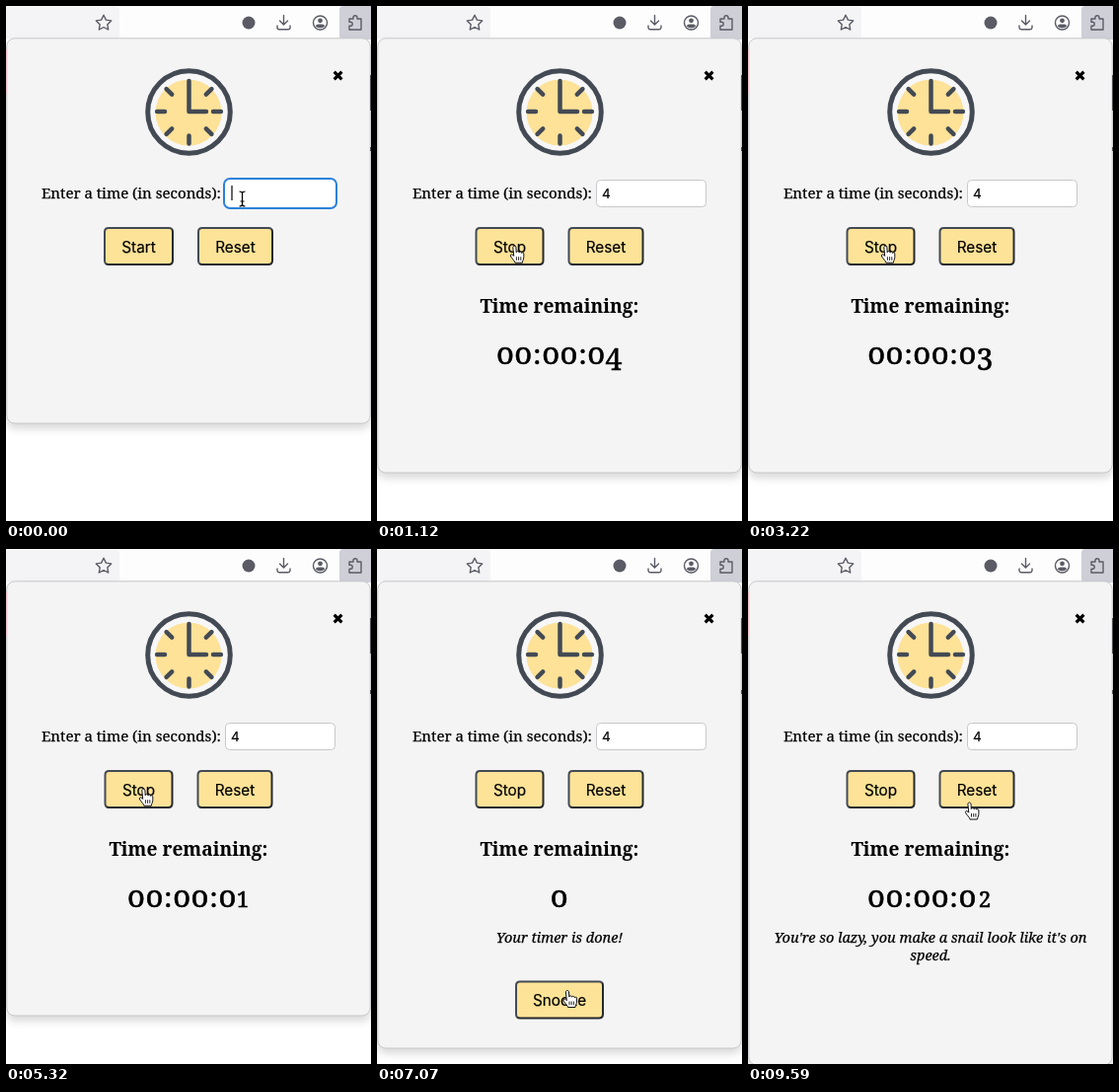
An HTML page that plays this animation: 370 by 522 pixels, repeating every 9.66 s.

```html
<!DOCTYPE html>
<html lang="en">
<head>
<meta charset="utf-8">
<title>Timer popup</title>
<style>
  html, body { margin: 0; width: 100%; height: 100%; overflow: hidden; background: #fff; }
  svg { display: block; width: 100%; height: 100%; }
  text { font-family: "Noto Serif", Georgia, serif; text-anchor: middle; white-space: pre; }
  .sans { font-family: Inter, "Liberation Sans", sans-serif; font-size: 15.3px; stroke: #000; stroke-width: .2; }
  .label { font-size: 15.05px; text-anchor: start; }
  .head { font-size: 19.15px; font-weight: 700; }
  .note { font-size: 14.5px; font-style: italic; }
  .label, .note { stroke: #000; stroke-width: .25; }
  .figure { stroke: #000; stroke-width: .6; }
  .icon { fill: none; stroke: #5b5b66; stroke-width: 1.4; stroke-linejoin: round; stroke-linecap: round; }
  .clock { fill: none; stroke: #434a54; stroke-width: 4.5; stroke-linecap: round; stroke-linejoin: round; }
  .edge { fill: none; stroke-width: 2; }
  #panel { fill: #f4f4f4; stroke: #c6c6c9; filter: drop-shadow(0 5px 4.5px rgba(0, 0, 0, .15)); }
</style>
</head>
<body>
<svg viewBox="0 0 370 522" xmlns="http://www.w3.org/2000/svg">
  <rect width="370" height="522" fill="#fff"/>
  <rect width="370" height="34" fill="#fdfdfd"/>
  <rect x="-8" y="1" width="123" height="32" rx="4" fill="#f4f4f6"/>
  <rect x="338" y="0" width="36" height="34" rx="4" fill="#cfcfd8"/>
  <g class="icon">
    <path d="M99 9.2l2.4 4.9 5.3.8-3.9 3.8.9 5.3-4.7-2.5-4.7 2.5.9-5.3-3.9-3.8 5.3-.8z"/>
    <path d="M281.5 9.5v9M277.5 15l4 4 4-4M275 20v1.7q0 2 2 2h9q2 0 2-2V20"/>
    <circle cx="318.5" cy="17" r="7"/>
    <path d="M348 13h4v-1.3a2 2 0 0 1 4 0V13h4v11h-12V20.2h1.2a2 2 0 0 0 0-4H348z"/>
  </g>
  <g fill="#5b5b66">
    <circle cx="246" cy="17" r="6.5"/>
    <circle cx="318.5" cy="14.8" r="2.4"/>
    <path d="M314 20.8q0-2.3 2.3-2.3h4.4q2.3 0 2.3 2.3-4.5 3-9 0z"/>
  </g>

  <rect id="panel" x=".8" y="32.8" width="368.4" rx="8"/>
  <path d="M.5 44v44" stroke="#f3c3cb"/>
  <path d="M369.5 70v36M369.5 143v4" stroke="#55555c"/>

  <circle cx="185.5" cy="107.5" r="41.8" fill="#f7f7f8" stroke="#434a54" stroke-width="5"/>
  <circle cx="185" cy="108" r="33.5" fill="#fde298"/>
  <g class="clock">
    <path id="ticks"/>
    <path d="M185.5 76v31H203"/>
  </g>
  <text x="336.5" y="76.3" font-size="15" style="font-family:'DejaVu Sans',sans-serif">✖</text>

  <text class="label" x="36" y="195">Enter a time (in seconds):</text>
  <rect id="field" fill="#fff"/>
  <text id="typed" class="sans" x="232.3" y="194.8" style="font-size:13.6px">4</text>
  <path id="caret" stroke="#000" stroke-width="1.2"/>

  <g id="buttons"></g>
  <g id="timer"></g>
  <g id="cursor"></g>
</svg>
<script>
const LOOP = 9660, STEP = 70;
const $ = id => document.getElementById(id);
const cache = {};

function html(id, markup) {
  if (cache[id] !== markup) $(id).innerHTML = cache[id] = markup;
}
function attrs(id, values) {
  for (const name in values) $(id).setAttribute(name, values[name]);
}
// Last value whose start time has passed
function at(t, rows) {
  return rows.reduce((value, row) => t >= row[0] ? row[1] : value, rows[0][1]);
}
const within = (t, ...spans) => spans.some(([a, b]) => t >= a && t < b);

const text = (cls, x, y, str) => `<text class="${cls}" x="${x}" y="${y}">${str}</text>`;

function button({ x, y, w, h, label, down }) {
  const [light, dark] = down ? ['#25292e', '#434a54'] : ['#434a54', '#25292e'];
  const r = x + w - 1, b = y + h - 1, l = x + 1, top = y + 1;
  return `<rect x="${l}" y="${top}" width="${w - 2}" height="${h - 2}" rx="4" fill="#fde397"/>
    <path class="edge" stroke="${light}" d="M${l + 1} ${b - 1}Q${l} ${b - 2} ${l} ${b - 4}V${top + 4}Q${l} ${top} ${l + 4} ${top}H${r - 4}Q${r - 2} ${top} ${r - 1} ${top + 1}"/>
    <path class="edge" stroke="${dark}" d="M${l + 1} ${b - 1}Q${l + 2} ${b} ${l + 4} ${b}H${r - 4}Q${r} ${b} ${r} ${b - 4}V${top + 4}Q${r} ${top + 2} ${r - 1} ${top + 1}"/>`
    + text('sans', x + w / 2, y + h / 2 + 6.2, label);
}

// Old-style figures: [glyph, size, drop, advance]
const FIGURES = {
  0: ['o', 31, 0, 18.4], 1: ['1', 22.4, 0, 12.9], 2: ['2', 22.4, 0, 16.8],
  3: ['3', 30, 5.8, 16.6], 4: ['4', 30, 5.8, 17], ':': [':', 28, 0, 9.4]
};
function figures(str) {
  const set = [...str].map(c => FIGURES[c]);
  let x = 184.6 - set.reduce((sum, f) => sum + f[3], 0) / 2;
  return set.map(([glyph, size, drop, adv]) => {
    x += adv;
    return `<text class="figure" font-size="${size}" x="${x - adv / 2}" y="${363 + drop}">${glyph}</text>`;
  }).join('');
}

const SHAPES = {
  beam: `<path d="M-3-7q3 0 3 2V6q0 2-3 2M3-7q-3 0-3 2M0 6q0 2 3 2M-2 3H2" fill="none" stroke="#fff" stroke-width="2.6"/>
    <path d="M-3-7q3 0 3 2V6q0 2-3 2M3-7q-3 0-3 2M0 6q0 2 3 2M-2 3H2" fill="none" stroke="#000" stroke-width="1.2"/>`,
  hand: `<path d="M-1.6 1.5c0-2 3-2 3.1 0l.3 5c0-1.6 2.8-1.5 2.8.2 .2-1.3 2.6-1.1 2.6.5 .3-1 2.2-.7 2.2.8v3.5c0 2-1.2 3-1.4 5.5H.5c-.4-2-2.6-3.7-4.2-6.2-1.2-1.9.8-3 2.1-1.6l.9 1z"
    fill="#fff" stroke="#111" stroke-linejoin="round"/><path d="M2 11v3.6M4.2 11v3.6M6.4 11v3.6" stroke="#111" stroke-width=".9"/>`,
  arrow: `<path d="M0 0v13l3-2.8 2 4.8 2.4-1-2-4.7h4.1z" fill="#000" stroke="#fff" stroke-linejoin="round"/>`
};

// Pointer tip: [time, x, y]
const PATH = [
  [490, 239.5, 195], [910, 139.4, 243.2], [5320, 139.4, 243.2], [5670, 194, 408],
  [6650, 194, 408], [7000, 193, 447.5], [8540, 193, 447.5], [9590, 224.5, 257]
];
function pointer(t) {
  const i = PATH.findIndex(p => t < p[0]);
  if (i < 1) return PATH[i ? PATH.length - 1 : 0].slice(1);
  const [t0, x0, y0] = PATH[i - 1], [t1, x1, y1] = PATH[i];
  const p = (t - t0) / (t1 - t0), s = p * p * (3 - 2 * p);
  return [x0 + (x1 - x0) * s, y0 + (y1 - y0) * s];
}
const over = (x, y, r) => x >= r.x && x <= r.x + r.w && y >= r.y && y <= r.y + r.h;

function draw(t) {
  const focus = t < 980;
  const label = t < 1050 || within(t, [2450, 3220]) ? 'Start' : 'Stop';
  const shift = label === 'Stop' ? .5 : 0;
  const buttons = [
    { x: 99 + shift, y: 224, w: 71 - 2 * shift, h: 39, label,
      down: within(t, [980, 1050], [2310, 2450], [3080, 3220]) },
    { x: 194 - shift, y: 224, w: 77, h: 39, label: 'Reset' }
  ];
  if (within(t, [6440, 7210]))
    buttons.push({ x: 140, y: 437.5, w: 90, h: 39, label: 'Snooze', down: t >= 7140 });
  html('buttons', buttons.map(button).join(''));

  attrs('panel', { height: at(t, [[0, 423], [1120, 473], [6440, 506], [7280, 523]]) - 32.8 });
  attrs('field', focus
    ? { x: 221, y: 175, width: 114, height: 30, rx: 6, stroke: '#2b82d9', 'stroke-width': 2 }
    : { x: 222.5, y: 176.5, width: 111, height: 27, rx: 4, stroke: '#c8c8cc', 'stroke-width': 1 });
  attrs('typed', { opacity: t >= 490 ? 1 : 0 });
  attrs('caret', {
    d: t >= 490 ? 'M238 182v15' : 'M229 182v15',
    opacity: at(t, [[0, 1], [70, .4], [140, 0], [490, 1], [980, 0]])
  });

  const count = at(t, [[0, ''], [1050, 4], [2170, 3], [4270, 2], [5320, 1],
    [6440, 0], [7210, 4], [8330, 3], [9380, 2]]);
  let timer = '';
  if (count !== '') {
    timer = text('head', 184.8, 310.6, 'Time remaining:') + figures(count ? '00:00:0' + count : '0');
    if (t >= 7210)
      timer += text('note', 185, 399, "You're so lazy, you make a snail look like it's on")
        + text('note', 185, 416.5, 'speed.');
    else if (t >= 6440) timer += text('note', 185, 399, 'Your timer is done!');
  }
  html('timer', timer);

  const [x, y] = pointer(t);
  const shape = over(x, y, { x: 222, y: 176, w: 112, h: 28 }) ? 'beam'
    : buttons.some(b => over(x, y, b)) ? 'hand' : 'arrow';
  html('cursor', SHAPES[shape]);
  attrs('cursor', { transform: `translate(${x} ${y})` });
}

let ticks = '';
for (let i = 1; i < 8; i++) {
  const a = i * Math.PI / 4, dx = Math.sin(a), dy = -Math.cos(a);
  ticks += `M${185.5 + 24.5 * dx} ${107 + 24.5 * dy}L${185.5 + 32.4 * dx} ${107 + 32.4 * dy}`;
}
attrs('ticks', { d: ticks });

function tick() {
  const t = performance.now() % LOOP;
  draw(Math.floor(t / STEP) * STEP);
  requestAnimationFrame(tick);
}
tick();
</script>
</body>
</html>
```
